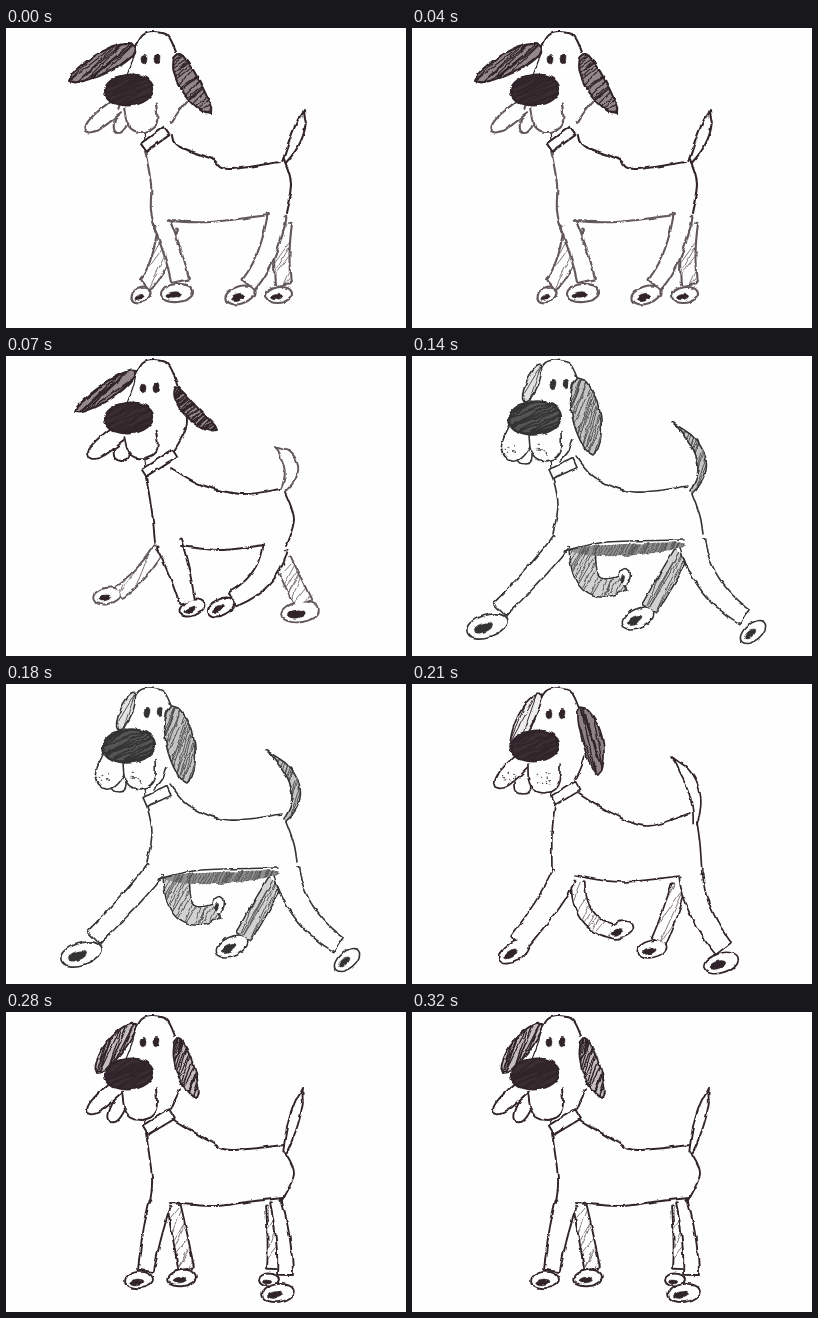
These frames come from a looping animation (400x300 px, 0.35 s). An HTML page:

```html
<!DOCTYPE html>
<html lang="en">
<head>
<meta charset="utf-8">
<title>Walking dog</title>
<style>
html, body { margin: 0; width: 100%; height: 100%; overflow: hidden; background: #fefefe; }
svg { display: block; width: 100%; height: 100%; }
.pose { opacity: 0; animation: show 350ms step-end infinite; animation-delay: calc(var(--i) * 70ms - 350ms); }
@keyframes show { 0% { opacity: 1; } 20%, 100% { opacity: 0; } }
path { stroke-linecap: round; stroke-linejoin: round; }
</style>
</head>
<body>
<svg id="stage" viewBox="0 0 400 300">
  <filter id="rough" color-interpolation-filters="sRGB">
    <feTurbulence type="fractalNoise" baseFrequency=".09" numOctaves="3"/>
    <feDisplacementMap in="SourceGraphic" scale="4" xChannelSelector="R" yChannelSelector="G"/>
  </filter>
</svg>
<script>
const stage = document.getElementById('stage');
const PAPER = '#fefefe';
let seed = 7, clips = 0, layer, pen;

const rand = () => (seed = (seed * 16807) % 2147483647) / 2147483647;
const points = s => s.split(' ').map(p => p.split(',').map(Number));

function add(tag, attrs, parent = layer) {
  const el = document.createElementNS('http://www.w3.org/2000/svg', tag);
  for (const k in attrs) el.setAttribute(k, attrs[k]);
  return parent.appendChild(el);
}

const trace = (d, { fill = 'none', stroke = pen.ink, w = pen.w } = {}, parent) =>
  add('path', { d, fill, stroke, 'stroke-width': w }, parent);

// Smooth curve through a few points
function curve(s, dx = 0) {
  const p = points(s).map(([x, y]) => [x + dx, y]);
  const at = i => p[Math.max(0, Math.min(p.length - 1, i))];
  let d = 'M' + p[0];
  for (let i = 0; i < p.length - 1; i++) {
    const [a, b, c, e] = [at(i - 1), at(i), at(i + 1), at(i + 2)];
    d += `C${b.map((v, k) => v + (c[k] - a[k]) / 6)} ${c.map((v, k) => v - (e[k] - b[k]) / 6)} ${c}`;
  }
  return d;
}

// Width profiles along a limb, t from 0 to 1
const taper = (a, b) => t => a + (b - a) * t;
const pod = w => t => w * Math.sqrt(Math.sin(Math.PI * t));
const lip = w => t => w * Math.sqrt(1 - t ** 4);
const plume = w => t => w * (.35 + .65 * Math.sin(Math.PI * t)) * Math.min(1, (1 - t) * 5);

// Outline of given half-width around a parabola through two or three points
function tube(s, width, steps = 20) {
  const p = points(s), a = p[0], c = p[p.length - 1];
  const m = p.length > 2 ? p[1] : a.map((v, k) => (v + c[k]) / 2);
  const left = [], right = [];
  for (let i = 0; i <= steps; i++) {
    const t = i / steps;
    const mix = (u, v, w) => a.map((_, k) => a[k] * u + m[k] * v + c[k] * w);
    const [x, y] = mix((1 - t) * (1 - 2 * t), 4 * t * (1 - t), t * (2 * t - 1));
    const [vx, vy] = mix(4 * t - 3, 4 - 8 * t, 4 * t - 1);
    const r = width(t) / Math.hypot(vx, vy);
    left.push([x - vy * r, y + vx * r]);
    right.unshift([x + vy * r, y - vx * r]);
  }
  return 'M' + [...left, ...right].join('L');
}

const oval = (x, y, rx, ry, turn = 0) => {
  const a = turn * Math.PI / 180, ux = rx * Math.cos(a), uy = rx * Math.sin(a);
  const arc = `A${rx},${ry} ${turn} 0 1 `;
  return `M${x - ux},${y - uy}${arc}${x + ux},${y + uy}${arc}${x - ux},${y - uy}Z`;
};

const blob = (...o) => trace(oval(...o), { fill: pen.ink, w: .5 });

// Back-and-forth scribble kept inside a shape
function hatch(d, { tone = 'none', angle = 120, gap = 2.6, w = 1.2, ink = pen.ink } = {}) {
  const id = 'c' + clips++;
  trace(d, {}, add('clipPath', { id }));
  const g = add('g', { 'clip-path': `url(#${id})` });
  const { x, y, width, height } = trace(d, { fill: tone, stroke: 'none' }, g).getBBox();
  const r = Math.hypot(width, height) / 2;
  let z = `M${-r},${-r}`;
  for (let v = -r, side = 1; v < r; v += gap * (.4 + rand() * 1.2), side = -side)
    z += `L${side * r},${v + rand() * 6 - 3}`;
  trace(z, { stroke: ink, w }, g)
    .setAttribute('transform', `translate(${x + width / 2} ${y + height / 2}) rotate(${angle})`);
}

// Leg and paw share one outline; a dark toe patch lies low on the paw
function leg([path, w0, w1, x, y, size, turn], far) {
  const ink = far ? pen.farInk : pen.legInk;
  const limb = tube(path, taper(w0, w1)), paw = oval(x, y, size, size * .4 + 2, turn);
  for (const d of [limb, paw]) trace(d, { stroke: ink, w: pen.w * 2 });
  for (const d of [limb, paw]) trace(d, { fill: PAPER, stroke: 'none' });
  if (far) hatch(limb, pen.shade);
  blob(x - size * .2, y + 2, size * .5, size * .22, turn);
}

function ear([path, w], style) {
  const d = tube(path, pod(w));
  hatch(d, style);
  trace(d);
}

function nose(size) {
  const d = oval(123, 62, size, size * .63, -4);
  hatch(d, { tone: pen.noseTone, angle: -25, gap: 2.4, w: 1.6 });
  trace(d, { w: 2.4 });
}

function dog(p) {
  pen = { w: 2, farInk: p.pen.ink, legInk: p.pen.ink, noseTone: '#3a2e30', ...p.pen };
  p.far.forEach(l => leg(l, true));
  p.near.forEach(l => leg(l));
  if (p.under) hatch(tube(p.under, pod(6)), { ...pen.shade, tone: '#909090', gap: 2 });

  trace(curve(p.chest), { stroke: pen.legInk });
  trace(curve(p.belly), { stroke: pen.legInk });
  trace(curve(p.back));
  trace(curve(p.rump));
  const tail = tube(p.tail[0], plume(p.tail[1]));
  if (p.tail[2]) hatch(tail, pen.earStyle);
  trace(tail, { stroke: pen.tailInk || pen.ink });

  trace(curve('138,103 139,113'), { w: 1.2 });
  trace(curve(p.cheek), { stroke: pen.legInk });
  trace(tube(p.collar[0], () => p.collar[1]) + 'Z', { fill: PAPER });
  trace(curve('130,18 137,7 148,4 162,8 170,24', p.head));
  trace(curve('130,18 127,31 121,47', p.head), { w: 1.2 });
  ear(p.ears[0], { ...pen.earStyle, ...pen.backEar });
  ear(p.ears[1], pen.earStyle);
  const [ex, ey] = p.eyes;
  for (const x of [ex, ex + 13]) blob(x, ey, 2.9, 4.7, 8);

  const [tongue, ...jowls] = p.mouth;
  for (const [path, w] of [tongue, ...jowls])
    trace(tube(path, lip(w)), { fill: PAPER, stroke: pen.legInk });
  if (pen.freckles)
    for (let i = 0; i < 24; i++)
      blob((i % 2 ? 90 : 125) + rand() * 14, 88 + rand() * 12, .3, .3);
  nose(p.nose || 24);
}

const INK = '#30242a', SOFT = '#62575a', PENCIL = '#333';
const light = { gap: 6, w: .7, ink: SOFT };

const poses = [
  {
    pen: { ink: INK, w: 2.1, legInk: SOFT, farInk: SOFT, shade: light,
      earStyle: { tone: '#94888a', angle: 140, gap: 2.6, w: 1.2 } },
    near: [['156,196 167,226 174,252', 7.5, 8, 171, 265, 15, -5],
           ['271,188 260,227 243,256', 8.5, 7, 234, 267, 14, -18]],
    far: [['162,200 152,236 139,256', 9, 6, 135, 267, 9, -25],
          ['279,195 276,226 277,256', 6, 7, 273, 267, 12, -8]],
    chest: '139,122 145,156 145,183 150,204', belly: '163,193 205,194 263,187',
    back: '166,108 172,118 206,131 222,141 274,134', rump: '278,131 285,155 280,186',
    tail: ['278,134 291,108 298,82', 5.5], collar: ['137.5,119.5 160.5,103', 5],
    head: 0, eyes: [138, 31], cheek: '181,73 173,83 165,95',
    ears: [['130,19 101,33 63,53', 10.5], ['172,26 182,53 205,86', 10]],
    mouth: [['120,80 111,105', 7], ['110,79 80,103', 8], ['134,78 138,104', 16]]
  },
  {
    pen: { ink: INK, w: 1.9, farInk: SOFT, tailInk: SOFT, shade: light,
      earStyle: { tone: '#94888a', angle: 140, gap: 2.3, w: 1.7 } },
    near: [['163,188 173,216 181,246', 12, 7, 186, 252, 12, -20],
           ['269,192 255,222 227,243', 12, 7, 215, 251, 13, -25]],
    far: [['153,193 134,218 113,236', 5, 6, 101, 240, 13, -12],
          ['277,205 288,228 297,247', 8, 8, 294, 256, 18, -8]],
    chest: '140,121 146,156 149,187', belly: '175,190 215,194 258,189',
    back: '165,112 196,129 236,138 274,133', rump: '279,136 288,163 280,190',
    tail: ['277,134 285,110 269,91', 7], collar: ['138,117 169,97.5', 4.5],
    head: 0, eyes: [137, 32], cheek: '170,22 181,66 166,98',
    ears: [['130,15 102,35 69,56', 8], ['170,31 184,54 211,74', 7]],
    mouth: [['116,93 115,105', 8], ['112,78 83,101', 9], ['134,78 139,102', 16]]
  },
  {
    pen: { ink: PENCIL, w: 1.6, noseTone: '#555', freckles: true,
      shade: { tone: '#d2d2d2', angle: 118, gap: 3.2, w: .9, ink: '#555' },
      earStyle: { tone: '#c4c4c4', angle: 110, gap: 2.5, w: .8, ink: '#444' }, backEar: { tone: '#e2e2e2' } },
    near: [['149,186 122,218 88,253', 9, 8, 75, 270, 20, -18],
           ['280,186 298,228 332,260', 12, 8, 341, 276, 14, -40]],
    far: [['170,194 180,228 210,227', 12, 7, 212, 221, 8, -70],
          ['270,198 252,228 238,252', 8, 8, 226, 262, 16, -25]],
    under: '157,194 212,194 275,188',
    chest: '140,118 146,148 141,178', belly: '152,195 195,186 272,184',
    back: '164,100 184,122 222,136 276,130', rump: '280,137 288,160 291,178',
    tail: ['279,136 289,102 260,66', 4.5, true], collar: ['139,118 163,107', 5],
    head: -4, eyes: [141, 28], cheek: '161,84 156,96 147,106', nose: 26,
    ears: [['128,9 120,28 112,46', 6], ['166,22 174,58 181,98', 14]],
    mouth: [['113,98 113,108', 7], ['111,74 96,104', 14], ['133,76 134,105', 16]]
  },
  {
    pen: { ink: INK, w: 1.7, shade: light, freckles: true,
      earStyle: { tone: '#8d8385', angle: 75, gap: 2.5, w: 1.4 }, backEar: { tone: '#eee', angle: 115, gap: 3.5, w: .9 } },
    near: [['152,192 134,222 107,258', 12, 9, 102, 268, 16, -30],
           ['279,192 289,228 311,264', 11, 9, 309, 279, 17, -18]],
    far: [['166,198 174,230 198,247', 6, 7, 208, 246, 13, -18],
          ['267,202 257,232 247,257', 7, 7, 240, 265, 14, -12]],
    chest: '143,120 140,150 140,188', belly: '163,192 210,198 267,192',
    back: '167,109 198,128 235,142 278,129', rump: '285,138 288,160 290,190',
    tail: ['283,139 281,104 260,73', 5.5], collar: ['142,116 166,102', 5],
    head: -3, eyes: [137, 30], cheek: '173,72 169,84 163,97',
    ears: [['129,10 113,36 100,68', 8], ['168,23 180,54 186,91', 10]],
    mouth: [['111,98 111,110', 8], ['111,76 84,103', 9], ['132,80 132,109', 16]]
  },
  {
    pen: { ink: INK, w: 1.9, shade: light,
      earStyle: { tone: '#c5bebf', angle: 112, gap: 2.5, w: 1.3 } },
    near: [['154,192 146,224 140,258', 10, 7, 133, 268, 13, -5],
           ['270,190 277,228 279,262', 5, 7, 272, 281, 15, -8]],
    far: [['168,195 174,224 180,256', 6, 7, 176, 266, 13, -8],
          ['265,194 267,228 267,256', 4, 5, 263, 268, 9, 0]],
    chest: '140,121 146,166 144,191', belly: '164,191 210,194 240,190 277,186',
    back: '168,108 205,130 225,138 278,133', rump: '279,140 288,162 275,190',
    tail: ['279,140 288,108 297,76', 5], collar: ['139.5,118 166,102', 5.5],
    head: -1, eyes: [137, 30], cheek: '174,78 168,90 165,97',
    ears: [['130,12 108,36 91,61', 9], ['172,26 179,56 191,86', 9]],
    mouth: [['116,88 105,110', 7], ['110,76 82,101', 8], ['133,78 136,108', 17]]
  }
];

poses.forEach((p, i) => {
  const holder = add('g', { class: 'pose', style: `--i:${i}` }, stage);
  layer = add('g', { filter: 'url(#rough)' }, holder);
  dog(p);
});
</script>
</body>
</html>
```
